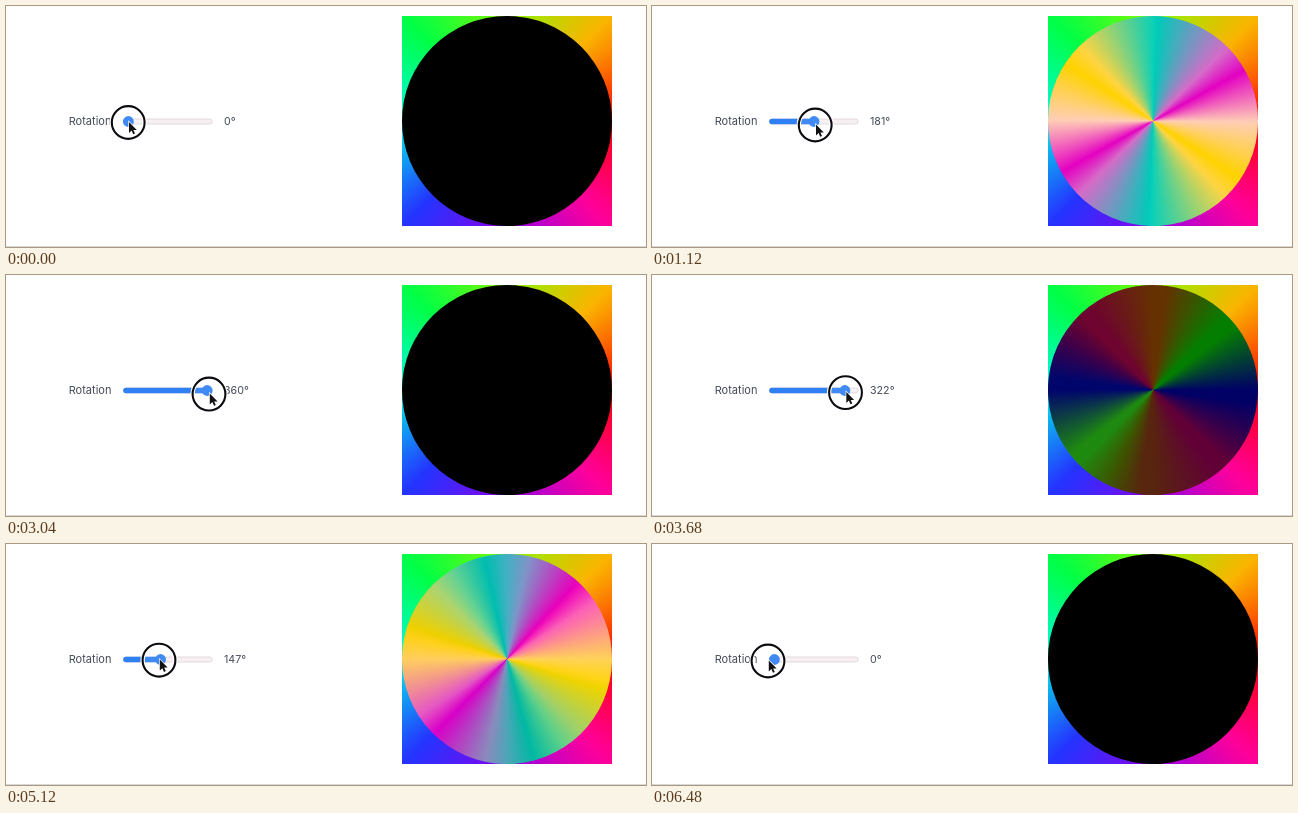
Recreate the animation shown at these times as an HTML page. Size 640 by 241 pixels, loop 6560 ms.

```html
<!DOCTYPE html>
<html lang="en">
<head>
<meta charset="utf-8">
<title>Rotation</title>
<style>
  html, body { margin: 0; width: 100%; height: 100%; overflow: hidden; background: #fff; }
  #stage { position: relative; width: 640px; height: 241px; overflow: hidden; }
  #stage > *, .wheel > * { position: absolute; }
  svg { inset: 0; }
  text { font: 10.7px Inter, sans-serif; fill: #444a58; }
  .label { font-size: 11px; }
  .wheel, .disc {
    background: conic-gradient(from 90deg,
      #f00, #ff0099, #8c00eb, #2434ff, #00f8e8, #00ff46, #82fa00, #fab400, #f00);
  }
  .wheel { left: 396px; top: 10px; width: 210px; height: 210px; isolation: isolate; }
  .disc, .tint { inset: 0; border-radius: 50%; }
  .disc { mix-blend-mode: difference; }
  .tint { background: #ffd4c8; mix-blend-mode: multiply; }
  .rule { left: 0; top: 240px; width: 640px; height: 1px; background: #d8d8d8; }
</style>
</head>
<body>
<div id="stage">
  <div class="wheel"><div class="disc" id="disc"></div><div class="tint"></div></div>
  <div class="rule"></div>
  <svg width="640" height="241">
    <text class="label" x="62.7" y="119.2">Rotation</text>
    <text x="218" y="119.2" id="value">0°</text>
    <rect x="117.5" y="113" width="88.6" height="5" rx="2.5" fill="#f7f0f3" stroke="#dcd0d6" stroke-width=".8"/>
    <rect x="117.2" y="112.7" height="5.6" rx="2.8" fill="#2f80f3" id="fill"/>
    <circle cy="115.5" r="5.4" fill="#2f80f3" id="thumb"/>
    <g id="pointer">
      <circle r="16.4" fill="#fff" fill-opacity=".08" stroke="#fff" stroke-width="4.4"/>
      <circle r="16.4" fill="none" stroke="#0b0b10" stroke-width="2.1"/>
      <path d="M.8-.6v11l2.6-2.4 1.6 3.7 1.8-.8-1.6-3.5h3.4z" fill="#111" stroke="#fff" stroke-width="1.4" paint-order="stroke"/>
    </g>
  </svg>
</div>
<script>
const LOOP = 6560, STEP = 80;

// time, angle, pointer x, pointer y
const keys = [
  [0, 0, 122.2, 116.5],
  [1120, 181, 163.2, 119],
  [2080, 320, 195, 119.8],
  [2500, 360, 203, 119.2],
  [3150, 360, 203, 119],
  [4240, 250, 176.2, 116.2],
  [5120, 147, 153, 116.2],
  [6150, 0, 121, 116.8],
  [6480, 0, 116, 117],
];

const slope = (i, c) => (keys[i + 1][c] - keys[i][c]) / (keys[i + 1][0] - keys[i][0]);

// Tangents that keep the curve monotone between keys
function tangent(i, c) {
  if (i === 0 || i === keys.length - 1) return 0;
  const a = slope(i - 1, c), b = slope(i, c);
  return a * b > 0 ? 2 * a * b / (a + b) : 0;
}

function sample(time, c) {
  let i = 0;
  while (i < keys.length - 2 && time >= keys[i + 1][0]) i++;
  const span = keys[i + 1][0] - keys[i][0];
  const u = (time - keys[i][0]) / span, v = 1 - u;
  return keys[i][c] * (1 + 2 * u) * v * v + keys[i + 1][c] * u * u * (3 - 2 * u)
    + span * u * v * (tangent(i, c) * v - tangent(i + 1, c) * u);
}

const el = id => document.getElementById(id);
const disc = el('disc'), value = el('value'), fill = el('fill'), thumb = el('thumb'), pointer = el('pointer');

function draw(time) {
  const angle = Math.round(sample(time, 1));
  const x = 122.4 + 78.8 * angle / 360;
  disc.style.transform = `rotate(${angle}deg)`;
  value.textContent = angle + '°';
  fill.setAttribute('width', x - 117.2);
  thumb.setAttribute('cx', x);
  pointer.setAttribute('transform', `translate(${sample(time, 2)} ${sample(time, 3)})`);
}

const start = performance.now();
function tick() {
  const time = (performance.now() - start) % LOOP;
  draw(Math.floor(time / STEP) * STEP);
  requestAnimationFrame(tick);
}
tick();
</script>
</body>
</html>
```
